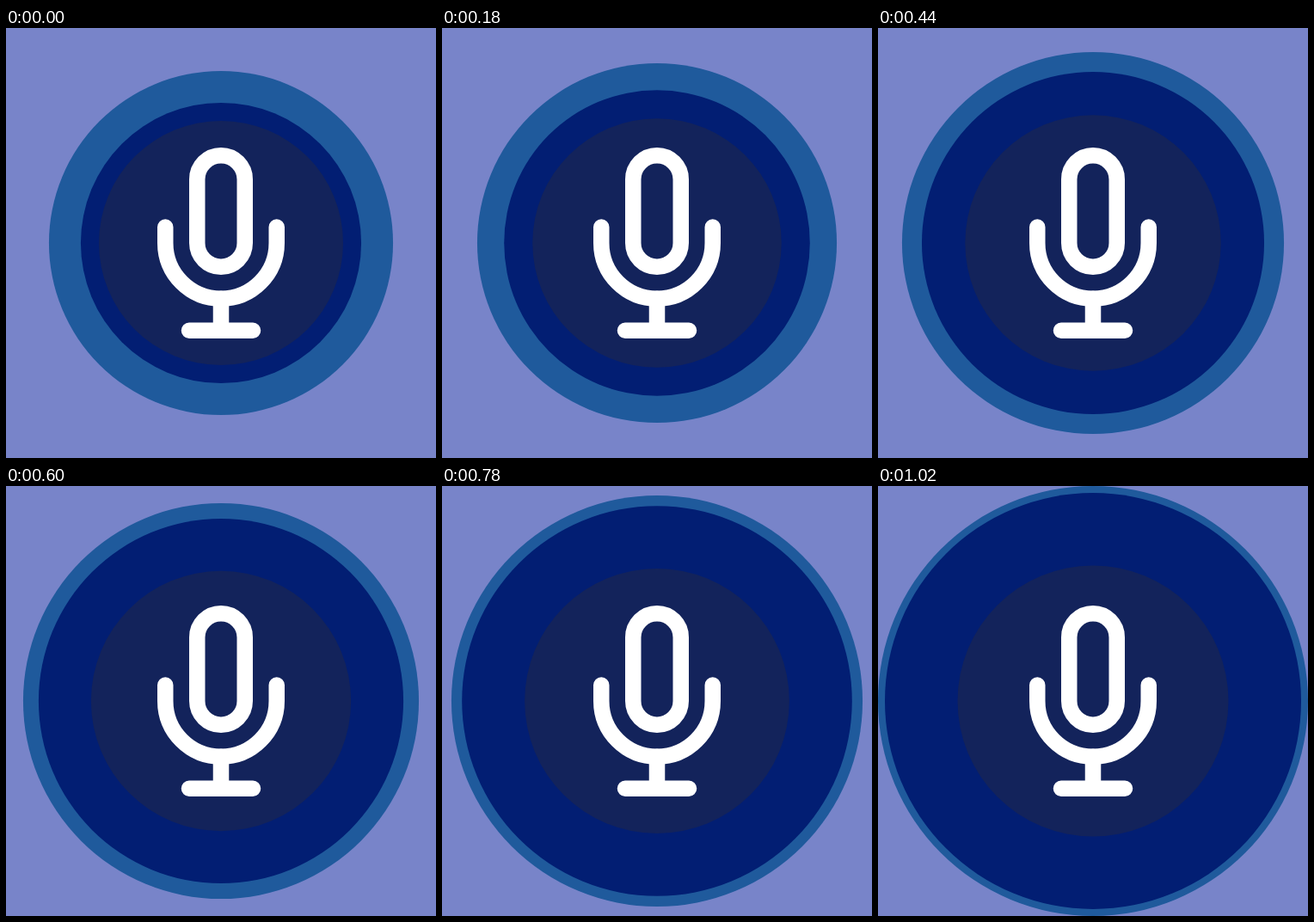
An HTML page without scripts for the animation above (1040 ms loop, 500 px wide and 500 px high).

```html
<!DOCTYPE html>
<html lang="en">
<head>
<meta charset="utf-8">
<title>Microphone pulse</title>
<style>
  html, body {
    margin: 0;
    width: 100%;
    height: 100%;
    overflow: hidden;
    background: #7884c9;
  }
  svg {
    display: block;
    width: 100%;
    height: 100%;
  }
  circle {
    animation: 1040ms linear infinite;
  }
  .outer { fill: #1f5a9c; r: 200px; animation-name: outer; }
  .middle { fill: #021e73; r: 163px; animation-name: middle; }
  .inner { fill: #13235b; r: 142px; animation-name: inner; }
  .mic {
    fill: none;
    stroke: #fff;
    stroke-width: 18.5;
    stroke-linecap: round;
  }
  /* each ring grows steadily, then rests until the loop restarts */
  @keyframes outer {
    0% { r: 200px; }
    96.15%, 100% { r: 250px; }
  }
  @keyframes middle {
    0% { r: 163px; }
    93%, 100% { r: 242px; }
  }
  @keyframes inner {
    0% { r: 142px; }
    98%, 100% { r: 157.5px; }
  }
</style>
</head>
<body>
<svg viewBox="0 0 500 500">
  <circle class="outer" cx="250" cy="250" r="200"/>
  <circle class="middle" cx="250" cy="250" r="163"/>
  <circle class="inner" cx="250" cy="250" r="142"/>
  <g class="mic">
    <rect x="222.25" y="148.25" width="55.5" height="129.5" rx="27.75"/>
    <path d="M185.25 231.5V250a64.75 64.75 0 0 0 129.5 0V231.5"/>
    <path d="M250 314.75V351.75M213 351.75H287"/>
  </g>
</svg>
</body>
</html>
```
